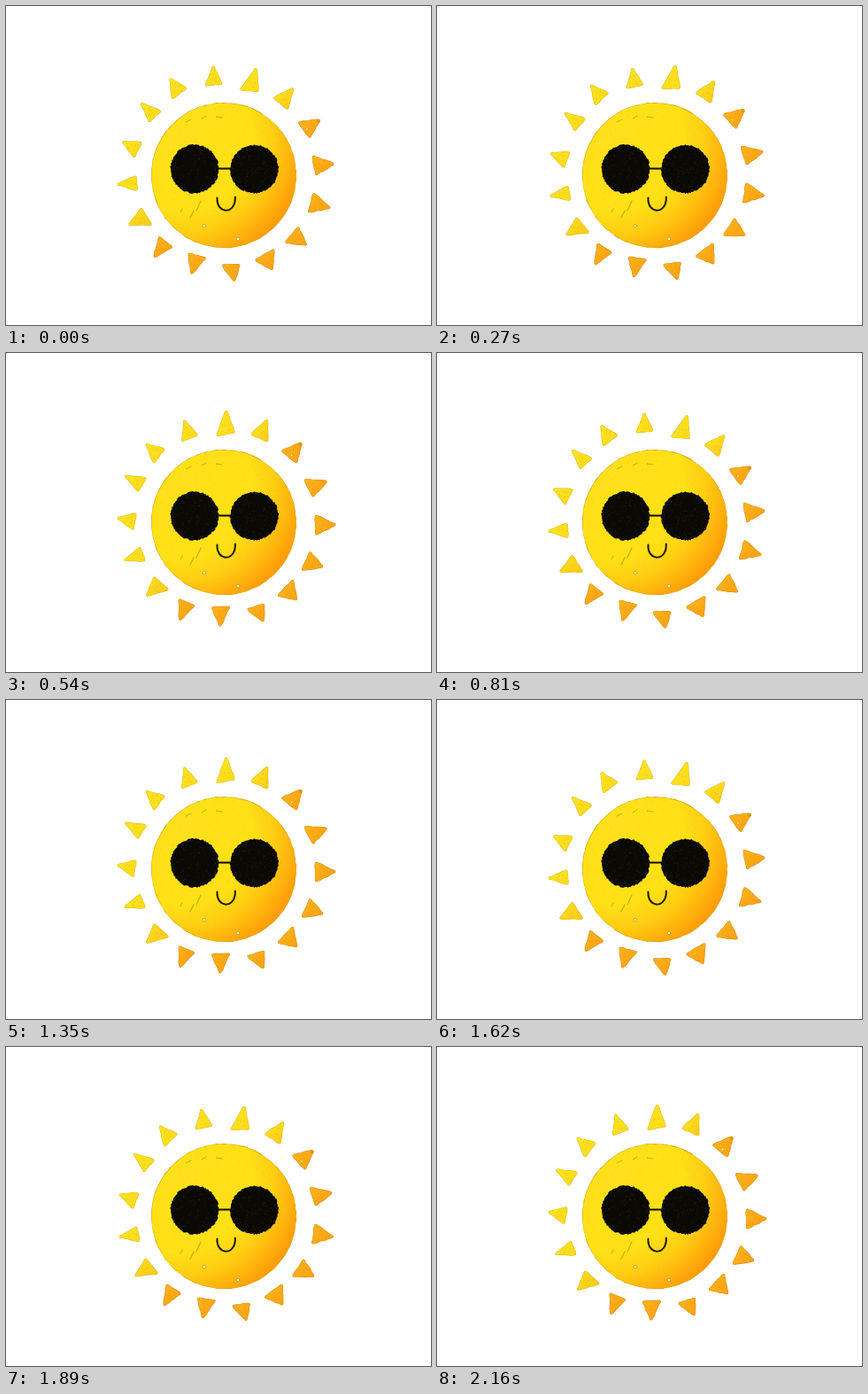
An HTML page with a canvas for the animation above (2.43 s loop, 480x360 px).

```html
<!DOCTYPE html>
<html lang="en">
<head>
<meta charset="utf-8">
<title>Sun</title>
<style>
html, body { margin: 0; width: 100%; height: 100%; overflow: hidden; background: #fff; }
canvas { display: block; width: 480px; height: 360px; }
</style>
</head>
<body>
<canvas id="stage" width="480" height="360"></canvas>
<script>
const ctx = document.getElementById('stage').getContext('2d');
const TAU = Math.PI * 2;
const STEP = 270;
const TURNS = [0, -6.4, -15.9]; // degrees
const HUB = [247, 189];

// Each ray: tip, then the two base corners
const RAYS = [
  [234, 67, 225, 90, 244, 88], [283, 69, 264, 95, 285, 97],
  [325, 92, 302, 104, 318, 117], [355, 128, 330, 131, 343, 149],
  [371, 178, 346, 169, 350, 191], [367, 228, 347, 211, 341, 233],
  [340, 270, 330, 249, 315, 267], [301, 298, 303, 274, 281, 287],
  [258, 311, 244, 292, 264, 292], [209, 303, 206, 279, 226, 284],
  [167, 284, 173, 260, 188, 272], [138, 247, 153, 228, 165, 247],
  [125, 201, 147, 192, 148, 208], [131, 153, 153, 154, 145, 171],
  [152, 109, 175, 119, 162, 131], [185, 81, 204, 93, 188, 105]
];

function seeded(seed) {
  return () => (seed = (seed * 16807) % 2147483647) / 2147483647;
}

function disc(x, y, r, fill) {
  ctx.beginPath();
  ctx.arc(x, y, r, 0, TAU);
  ctx.fillStyle = fill;
  ctx.fill();
}

function roughDisc(x, y, r, wobble, fill, rnd) {
  ctx.beginPath();
  for (let i = 0; i < 120; i++) {
    const a = i / 120 * TAU, d = r + (rnd() - 0.5) * wobble;
    ctx.lineTo(x + d * Math.cos(a), y + d * Math.sin(a));
  }
  ctx.closePath();
  ctx.fillStyle = fill;
  ctx.fill();
}

function grain(x, y, r, count, color, rnd) {
  ctx.fillStyle = color;
  for (let i = 0; i < count; i++) {
    const a = rnd() * TAU, d = r * Math.sqrt(rnd());
    ctx.fillRect(x + d * Math.cos(a), y + d * Math.sin(a), 1, 1);
  }
}

function stroke(points, width, color) {
  ctx.beginPath();
  for (let i = 0; i < points.length; i += 2) ctx.lineTo(points[i], points[i + 1]);
  ctx.lineWidth = width;
  ctx.strokeStyle = color;
  ctx.stroke();
}

// Yellow on the upper left, orange on the lower right
function rayTone() {
  const g = ctx.createLinearGradient(178, 178, 330, 222);
  g.addColorStop(0, '#fde01c');
  g.addColorStop(0.18, '#fbc51a');
  g.addColorStop(0.3, '#fbae19');
  g.addColorStop(1, '#fda516');
  return g;
}

function drawRay(p, i, rnd) {
  const cx = (p[0] + p[2] + p[4]) / 3, cy = (p[1] + p[3] + p[5]) / 3;
  const warm = i > 2 && i < 11;
  const g = ctx.createLinearGradient(cx - 10, cy - 10, cx + 10, cy + 10);
  g.addColorStop(0, warm ? '#fbb41c' : i === 11 ? '#fbdc1c' : '#fce41e');
  g.addColorStop(1, warm ? '#fba010' : i === 2 || i === 11 ? '#fac818' : '#fad91a');

  ctx.beginPath();
  for (let k = 0; k < 3; k++) {
    const x = p[2 * k], y = p[2 * k + 1];
    const n = (2 * k + 2) % 6, nx = p[n], ny = p[n + 1];
    for (let t = 0; t < 1; t += 0.2) {
      const j = t ? 0.9 : 0;
      ctx.lineTo(
        cx + (x + (nx - x) * t - cx) * 0.84 + (rnd() - 0.5) * j,
        cy + (y + (ny - y) * t - cy) * 0.84 + (rnd() - 0.5) * j);
    }
  }
  ctx.closePath();
  ctx.lineJoin = 'round';
  ctx.lineWidth = 3.6;
  ctx.strokeStyle = warm ? '#cf8a18' : '#d3b51c';
  ctx.stroke();
  ctx.lineWidth = 2.7;
  ctx.strokeStyle = ctx.fillStyle = g;
  ctx.stroke();
  ctx.fill();
  grain(cx, cy, 6, 8, 'rgba(200,140,0,.25)', rnd);
}

function drawRays(deg) {
  const rnd = seeded(41);
  ctx.save();
  ctx.translate(...HUB);
  ctx.rotate(deg * Math.PI / 180);
  ctx.translate(-HUB[0], -HUB[1]);
  RAYS.forEach((p, i) => drawRay(p, i, rnd));
  disc(353, 130, 2, '#dc9618');
  disc(340, 139, 0.8, '#fff');
  ctx.restore();
}

function drawBody() {
  const rnd = seeded(7);
  const g = ctx.createRadialGradient(198, 152, 10, 198, 152, 146);
  g.addColorStop(0, '#fee01a');
  g.addColorStop(0.52, '#fee016');
  g.addColorStop(0.7, '#ffcd12');
  g.addColorStop(0.86, '#ffb00c');
  g.addColorStop(1, '#ff9606');
  roughDisc(246, 191, 82, 0.8, '#d9a814', rnd);
  roughDisc(246, 191, 81.4, 0.6, g, rnd);
  grain(246, 191, 80, 260, 'rgba(225,165,0,.22)', rnd);

  ctx.lineCap = 'round';
  const olive = 'rgba(165,135,10,.6)';
  stroke([208, 239, 212, 231], 1.2, olive);
  stroke([215, 231, 220, 220], 1.2, olive);
  stroke([197, 233, 199, 229], 1, olive);
  stroke([187, 178, 190, 172], 1, olive);
  stroke([221, 127, 226, 124], 1, olive);
  stroke([237, 125, 244, 126], 1, olive);
  stroke([203, 131, 209, 128], 1, olive);
  for (const [x, y] of [[224, 248], [262, 263]]) {
    disc(x, y, 2, '#c89a20');
    disc(x, y, 1.3, '#fff');
  }
}

function drawFace() {
  const rnd = seeded(19);
  const ink = '#0b0903';
  for (const x of [213, 280.5]) {
    roughDisc(x, 184, 27.3, 1.5, ink, rnd);
    grain(x, 184, 26, 90, 'rgba(75,62,15,.45)', rnd);
  }
  stroke([239, 183.5, 255, 183.5], 2, ink);
  ctx.beginPath();
  ctx.moveTo(238.5, 216.5);
  ctx.bezierCurveTo(237.5, 235.5, 260, 235.5, 258.8, 215.5);
  ctx.lineWidth = 2;
  ctx.strokeStyle = '#1d1603';
  ctx.stroke();
}

function frame(now) {
  const pose = Math.floor(now / STEP) % TURNS.length;
  ctx.fillStyle = '#fff';
  ctx.fillRect(0, 0, 480, 360);
  drawRays(TURNS[pose]);
  drawBody();
  drawFace();
}

let start;
function tick(now) {
  start ??= now;
  frame(now - start);
  requestAnimationFrame(tick);
}
frame(0);
requestAnimationFrame(tick);
</script>
</body>
</html>
```
